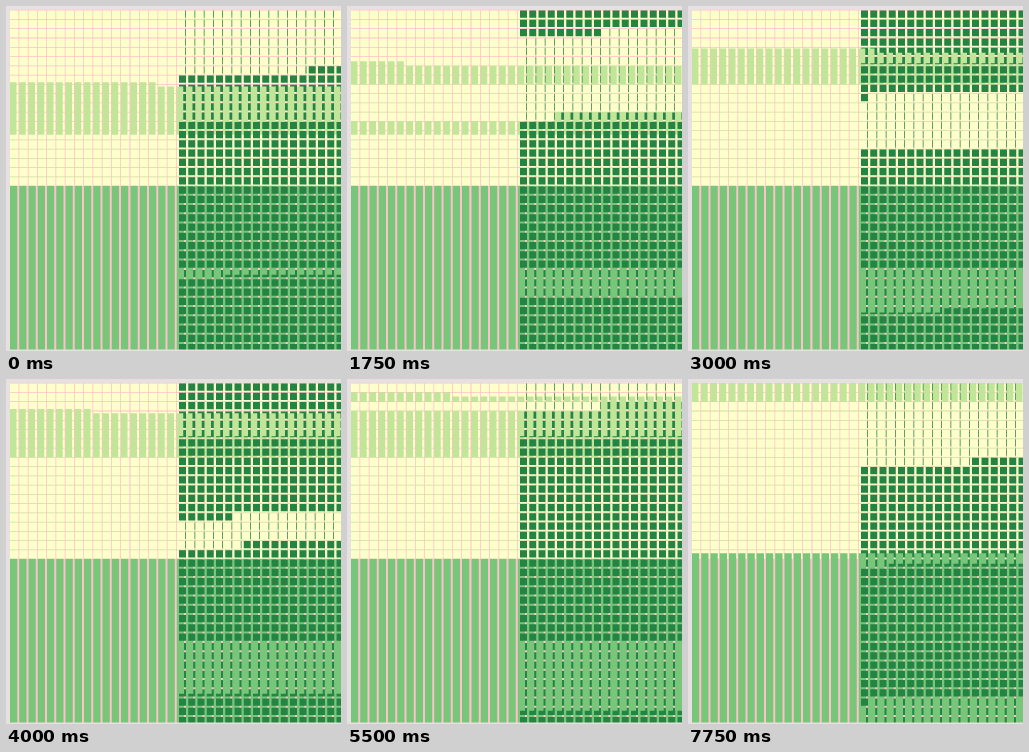
An HTML page with a canvas that plays this animation: 335 by 345 pixels, repeating every 8000 ms.

```html
<!DOCTYPE html>
<html lang="en">
<head>
<meta charset="utf-8">
<title>Grid sweeps</title>
<style>
  html, body { margin: 0; width: 100%; height: 100%; overflow: hidden; background: #e6e0e0; }
  canvas { display: block; }
</style>
</head>
<body>
<canvas id="stage" width="335" height="345"></canvas>
<script>
const W = 335, H = 345, SCALE = 4;
const LOOP = 8000, TICK = 250, CELLS_PER_TICK = 25, WARMUP = 1600;
const PITCH = 9.26, LINE = 4.2;

// Each sweep fills its cells row by row and wraps after `rows`.
// A sweep with `hold` repeats one row at that step.
const sweeps = [
  { color: '#238443', start: 575, cols: 19, rows: 37, x: 173, y: 4.6, dy: PITCH, w: 7, h: 7.2 },
  { color: '#ffffcc', start: 254, cols: 37, rows: 19, x: 4, y: 4.6, dy: PITCH, w: 8.4, h: 8.5 },
  { color: '#c2e699', start: 16, cols: 37, first: -23, hold: -300, x: 4, y: 76.2, dy: -LINE, w: 6.6, h: 6.2 },
  { color: '#78c679', start: 837, cols: 37, rows: 41, x: 4, y: 174.2, dy: LINE, w: 7.2, h: 6.2 }
];

const view = document.getElementById('stage').getContext('2d');
view.imageSmoothingQuality = 'high';

// Painted large on whole pixels, then scaled down for clean edges.
const sheet = document.createElement('canvas');
sheet.width = W * SCALE;
sheet.height = H * SCALE;
const ink = sheet.getContext('2d');

function rect(color, x, y, w, h) {
  const px = v => Math.round(v * SCALE);
  ink.fillStyle = color;
  ink.fillRect(px(x), px(y), px(w), px(h));
}

function paintCell(s, step) {
  const n = s.start + step + (step < s.hold ? s.cols : 0);
  let row = Math.floor(n / s.cols);
  const col = n - row * s.cols;
  if (s.rows) row = (row % s.rows + s.rows) % s.rows;
  else if (row < s.first) return;
  rect(s.color, s.x + col * PITCH, s.y + row * s.dy, s.w, s.h);
}

function paint(tick) {
  rect('#e6e0e0', 0, 0, W, H);
  ink.save();
  ink.beginPath();
  ink.rect(4 * SCALE, 4 * SCALE, (W - 4) * SCALE, 339.5 * SCALE);
  ink.clip();
  rect('#ffc0cb', 0, 0, W, H);
  for (let step = -WARMUP; step < tick * CELLS_PER_TICK; step++) {
    for (const s of sweeps) paintCell(s, step);
  }
  ink.restore();
  view.drawImage(sheet, 0, 0, W, H);
}

let shown = -1;
function frame() {
  const tick = Math.floor(performance.now() % LOOP / TICK);
  if (tick !== shown) paint(shown = tick);
  requestAnimationFrame(frame);
}
frame();
</script>
</body>
</html>
```
